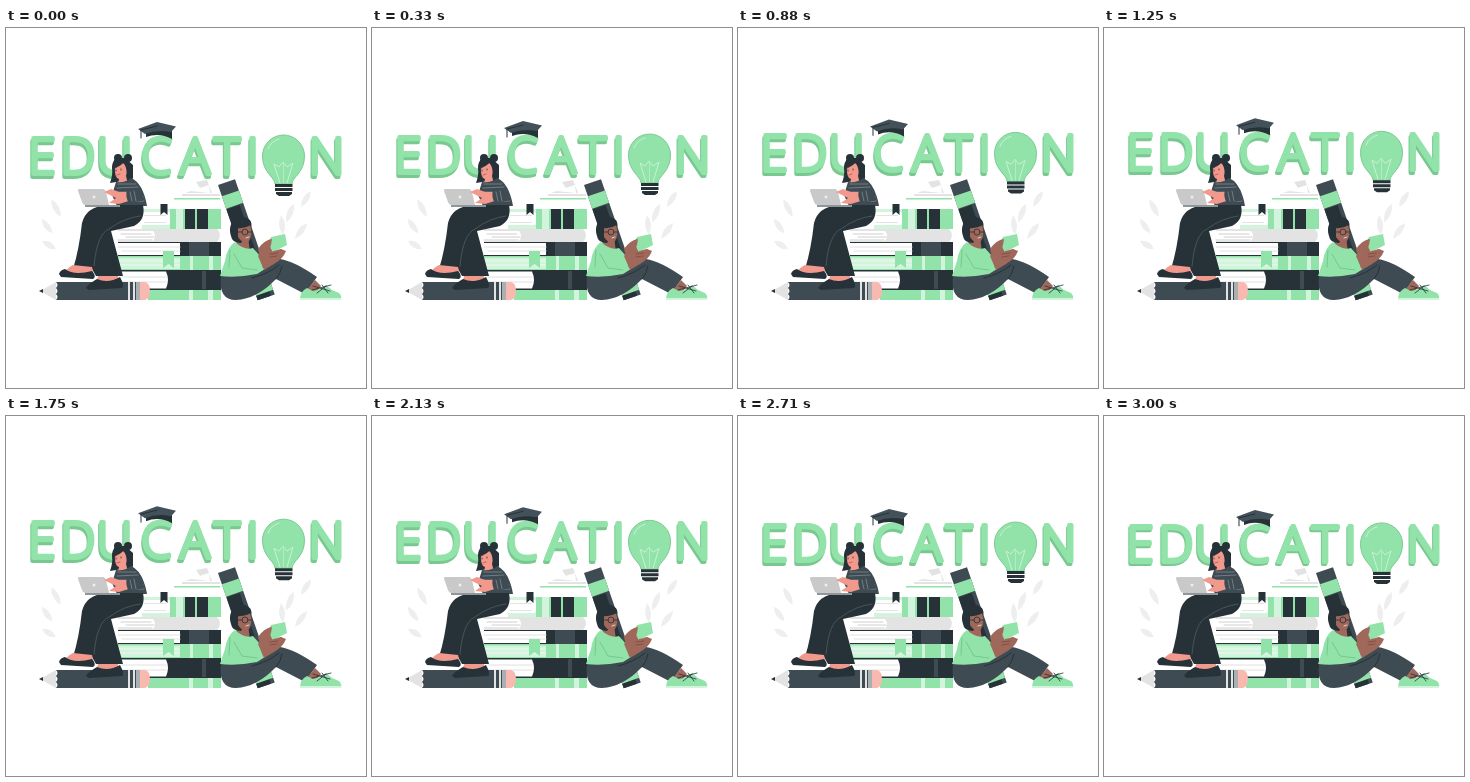
Recreate the animation shown at these times as an HTML page. Size 360 px wide and 360 px high, loop 3.04 s.

```html
<!DOCTYPE html>
<html lang="en">
<head>
<meta charset="utf-8">
<title>Education</title>
<style>
html, body { margin: 0; width: 100%; height: 100%; overflow: hidden; background: #fff }
svg { display: block; width: 100vw; height: 100vh }
text { font: 300 50px "Open Sans", sans-serif; text-anchor: middle; fill: currentColor; stroke: currentColor; stroke-width: 4; stroke-linejoin: round }
.g { fill: #92e3a9 } .d { fill: #263238 } .m { fill: #3f4b52 } .e { fill: #e3e3e3 }
.w { fill: #fff } .s { fill: #f2998d } .b { fill: #a0685a } .l { fill: #d3f4dc }
.line { fill: none; stroke-linecap: round; stroke-linejoin: round }
</style>
</head>
<body>
<svg viewBox="0 0 360 360">
  <defs>
    <text id="word" x="36 72 108.500 150.500 189 221 246.500 277.500 320.500" y="146">EDUCATI N</text>
  </defs>
  <g id="leaves" fill="#eee"></g>

  <!-- lettering, cap and bulb float together -->
  <g id="float">
    <use href="#word" x="-1" y="2.500" color="#79c890"/>
    <use href="#word" color="#92e3a9"/>
    <path class="d" d="M140 102V109Q153 104 166 111V101Z"/>
    <path d="M132 101L151 94L170 98.500L165 104Q151 101 139 106Z" fill="#43525a"/>
    <path class="line" stroke="#263238" d="M151 98L135 102V110"/>
    <path class="g" stroke="#7cca92" d="M269 156C269 149 256.500 145 256.500 128A21 21 0 0 1 298.500 128C298.500 145 286 149 286 156Z"/>
    <path class="line" stroke="#c9f1d4" d="M274 155L268 136L273 139L277 134L281 139L287 135L281 155M262 121Q265 113 273 111"/>
    <path class="line" stroke="#b5ebc4" d="M277.500 134V155"/>
    <path class="d" d="M269 156H286.500V159H269ZM269 160H286.500V163H269ZM270 164H286V166L283 168H273L270 166Z"/>
  </g>

  <!-- books -->
  <path class="e" d="M179 165L194 160L190 154L201 152L206 165Z"/>
  <path class="w" d="M184 163L203 157L204 165Z"/>
  <path class="e" d="M176 166H214V168H176Z"/>
  <path class="g" d="M168 170H214V171.500H168Z"/>
  <path class="l" d="M136 181H165V201H136Z"/>
  <path class="w" d="M134 184H163Q169 190 163 197H134Z"/>
  <path class="e" d="M138 187H160V188H138ZM138 194H160V195H138Z"/>
  <path class="d" d="M154.500 176H161.500V187L158 184L154.500 187Z"/>
  <path class="g" d="M164 181H215V201H164Z"/>
  <path class="l" d="M170 181H177V201H170Z"/>
  <path class="d" d="M179 181H189V201H179ZM191 181H202V201H191Z"/>
  <path class="e" d="M112 201H211Q217 207 211 214H112Z"/>
  <path class="w" d="M108 203H147Q151 208 147 213H108Z"/>
  <path class="line" stroke="#d0d0d0" d="M115 206H145M120 209H148M112 212H146"/>
  <path class="d" d="M112 214H215V228H112Z"/>
  <path class="w" d="M106 215H174V227H106Z"/>
  <path class="line" stroke="#e2e2e2" d="M112 219H174M116 223H174"/>
  <path class="m" d="M183 214H203V228H183Z"/>
  <path class="g" d="M110 228H215V243H110Z"/>
  <path class="l" d="M107 229.500H174V241H107ZM184 228H187V243H184ZM203 228H207V243H203Z"/>
  <path class="line" stroke="#eafaef" d="M112 233H173M112 237H173"/>
  <path class="g" d="M157 223H168V240L162.500 236L157 240Z"/>
  <path class="d" d="M114 242H215V262H114Z"/>
  <path class="w" d="M114 243.500H160Q164 252 160 260.500H114Z"/>
  <path class="line" stroke="#e0e0e0" d="M116 249H160M116 254H160"/>
  <path class="m" d="M196 243H200V261H196Z"/>
  <path class="g" d="M142 262H215V272H142Z"/>
  <path class="l" d="M183 262H187V272H183ZM202 262H207V272H202Z"/>

  <!-- leaning book -->
  <g transform="translate(212 157) rotate(-19)">
    <path class="m" d="M0 0H18V122H0Z"/>
    <path class="d" d="M0 26H14V122H0Z"/>
    <path class="g" d="M0 12H18V25H0ZM0 105H18V117H0Z"/>
  </g>

  <!-- reader on the ground -->
  <path class="m" d="M215 248Q212 272 230 272Q251 271 270 251L299 266L311 249Q288 233 274 231Q261 230 249 246Z"/>
  <path class="line" stroke="#263238" d="M246 250Q262 246 273 237M270 251Q275 245 276 238"/>
  <path class="b" d="M299 265L309 252L315 258L308 267Z"/>
  <path class="g" d="M294 272Q294 263 301 260L307 263Q314 262 320 257L326 262L333 265Q336 268 335 272Z"/>
  <path class="l" d="M294 270H335V272H294Z"/>
  <path class="line" stroke="#263238" stroke-width=".8" d="M307 258L324 263M306 262L325 257M311 265L320 258M316 257L322 265"/>
  <path class="b" d="M231 206L242 209L244 224L230 220Z"/>
  <path class="g" d="M229 214Q221 219 219 233L214 248Q231 250 251 246L259 241L254 228L247 220Q239 223 229 214Z"/>
  <path class="line" stroke="#77c88e" d="M228 226L236 240L251 242M224 222L223 239"/>
  <path class="d" d="M225 208C222 199 226 192 231 190C239 186 248 192 245 200L235 215Q226 215 225 208Z"/>
  <path class="b" d="M232 200L244 196Q247 208 243 213Q237 217 232 209Z"/>
  <path class="d" d="M230 200Q236 201 245 197L244 192H231Z"/>
  <path class="line" stroke="#263238" stroke-width=".8" d="M231 204H236M243 204H246"/>
  <circle class="line" cx="239" cy="204" r="3" stroke="#263238" stroke-width=".8"/>
  <path class="line" stroke="#fff" stroke-width=".7" d="M240 210L243 209"/>
  <path class="b" d="M252 228L265 210L270 213L265 226L275 221L280 223Q277 231 268 236L258 242Z"/>
  <path class="g" d="M265 209L279 206L281 217L267 224Q262 218 265 209Z"/>
  <path class="b" d="M252 221Q258 212 266 211L265 217L260 225L275 221L278 224L268 235L257 240Z"/>
  <path class="line" stroke="#7b4c42" stroke-width=".8" d="M264 226L272 225M264 229L271 228"/>

  <!-- pencil -->
  <path class="e" d="M34 263L50 254V272Z"/>
  <path class="d" d="M33 263L37 261V265Z"/>
  <path class="m" d="M50 254H132V272H50Q53 269 50 266Q53 263 50 260Q53 257 50 254Z"/>
  <path class="e" d="M122 254H124V272H122ZM127 254H129V272H127Z"/>
  <path d="M130 254H134V272H130Z" fill="#a9b0b3"/>
  <path d="M134 254H139Q144 255 144 263T139 272H134Z" fill="#f8b9b1"/>

  <!-- girl on the books -->
  <path class="d" d="M104 155Q107 147 106 140C106 130 114 128 120 131Q126 134 125 143L127 156L120 153L110 154Z"/>
  <circle class="d" cx="112" cy="130" r="4"/>
  <circle class="d" cx="122" cy="130" r="4"/>
  <path class="s" d="M109 137L118 135Q122 143 120 148L122 156H112L113 151Q108 150 109 137Z"/>
  <path class="d" d="M107 140Q114 139 117 135Q122 138 123 149L127 151V137L119 130L108 132Z"/>
  <path class="line" stroke="#263238" stroke-width=".8" d="M110 142V143M115 141V142M109 140L111 139"/>
  <path class="line" stroke="#c64f4c" stroke-width=".8" d="M111 147L114 146"/>
  <path class="m" d="M110 154Q120 155 125 150Q137 155 141 178H111L106 167Z"/>
  <path class="line" stroke="#87939a" stroke-width=".7" d="M112 156H130M111 160L132 159M109 164H134M124 169H137M124 174L138 173"/>
  <path class="d" d="M100 177H137Q140 192 128 198L105 203L117 248H90L86 241H67Q73 222 76 195Q80 179 100 177Z"/>
  <path class="line" stroke="#4f5d64" stroke-width=".8" d="M134 188Q118 190 103 201Q91 206 88 238"/>
  <path class="s" d="M67 237L86 239L88 247L58 247Q59 241 67 237ZM92 248H112L113 256L90 257Z"/>
  <path class="d" d="M53 246Q54 242 59 241Q68 248 86 243Q91 249 87 251L55 249Z"/>
  <path class="d" d="M80 260Q82 256 91 251Q102 256 114 249Q119 258 116 260L83 262Z"/>
  <path d="M73 161H97Q99 161 100 164L103 177H79Q77 177 76 174L72 163Q72 161 73 161Z" fill="#c9c9c9"/>
  <path d="M79 177H114V179H79Z" fill="#90979a"/>
  <circle cx="88" cy="169" r="1.500" fill="#eee"/>
  <path class="s" d="M98 164L105 161L113 164H123L126 172L113 176L103 175L110 170Z"/>
  <path class="m" d="M121 162L133 160L138 172L123 176Q119 168 121 162Z"/>
  <path class="line" stroke="#87939a" stroke-width=".7" d="M124 164L126 173M128 163L130 173"/>
</svg>
<script>
const LOOP = 3040, LIFT = 4.5;
const float = document.getElementById('float');

// x, y, angle, half-length
const leaves = [
  [50, 180, -28, 10], [41, 198, -35, 9], [43, 217, -60, 8],
  [300, 171, 32, 9], [284, 185, 22, 10], [295, 203, 38, 10], [276, 197, -5, 10]
];
document.getElementById('leaves').innerHTML = leaves.map(([x, y, a, h]) =>
  `<path transform="translate(${x} ${y}) rotate(${a})" d="M0 ${-h}Q6 0 0 ${h}Q-6 0 0 ${-h}Z"/>`
).join('');

// steady rise for half the loop, steady fall for the rest
function draw() {
  const phase = performance.now() % LOOP / LOOP;
  const y = -LIFT * (1 - Math.abs(1 - 2 * phase));
  float.setAttribute('transform', `translate(0 ${y.toFixed(2)})`);
  requestAnimationFrame(draw);
}
draw();
</script>
</body>
</html>
```
